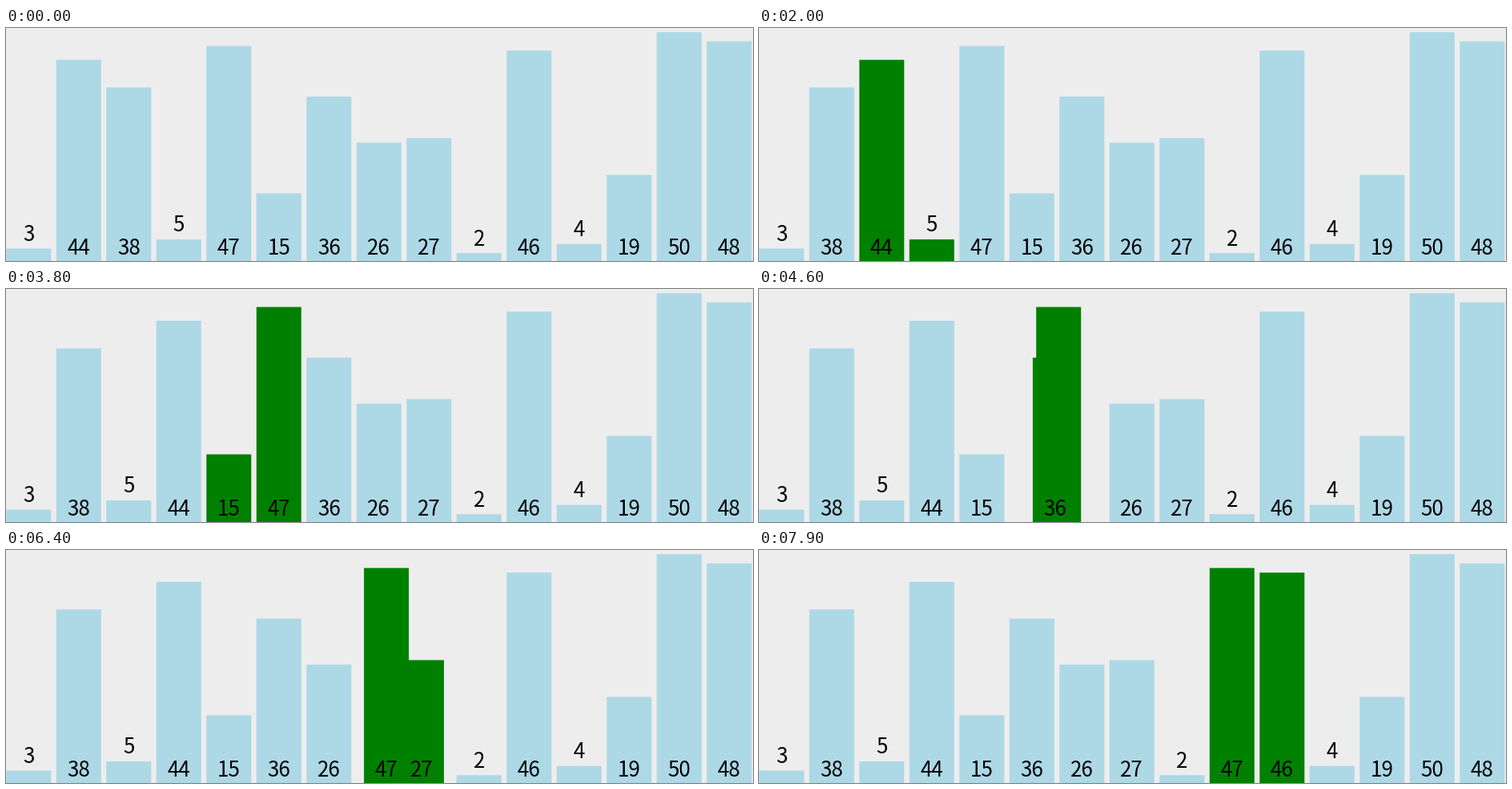
These frames come from a looping animation (933x291 px, 8 s). A matplotlib script:

```python
import matplotlib.pyplot as plt
import numpy as np
from matplotlib.animation import FuncAnimation
from matplotlib.patches import Rectangle

W, H, DPI = 933, 291, 64
FRAMES, INTERVAL = 80, 100

VALUES = [3, 44, 38, 5, 47, 15, 36, 26, 27, 2, 46, 4, 19, 50, 48]
PITCH, LEFT, BAR_W = 62.5, 0.3, 56
UNIT, BASE = 5.75, 292.75
FONT_PX = 26

BLUE = np.array([173, 216, 230]) / 255
GREEN = np.array([0, 128, 0]) / 255

# Start times in ms: highlighting pair (i, i + 1), then swapping it if needed.
MARKS = [370, 820, 1750, 2670, 3115, 4030, 4945, 5870, 6790, 7720]
SWAPS = {1: 1290, 2: 2215, 4: 3545, 5: 4470, 6: 5390, 7: 6333, 8: 7250}
FADE_MS, SWAP_MS = 200, 250


def bezier_ease(x1, y1, x2, y2):
    u = np.linspace(0, 1, 201)

    def curve(a, b):
        return 3 * a * u * (1 - u) ** 2 + 3 * b * u ** 2 * (1 - u) + u ** 3

    xs, ys = curve(x1, x2), curve(y1, y2)
    return lambda t: float(np.interp(t, xs, ys))


ease = bezier_ease(0.25, 0.1, 0.25, 1)
ease_in_out = bezier_ease(0.42, 0, 0.58, 1)


def state_at(ms):
    """Return the slot, green share and stacking rank of every value."""
    order = list(VALUES)
    shade = dict.fromkeys(VALUES, 0.0)
    active, shift = (), 0.0
    for i, start in enumerate(MARKS):
        if ms < start:
            break
        if shift:
            order[i - 1], order[i] = order[i], order[i - 1]
        previous, active = active, (order[i], order[i + 1])
        k = ease((ms - start) / FADE_MS)
        shade = {v: (1 - k) * (v in previous) + k * (v in active)
                 for v in VALUES}
        shift = ease_in_out((ms - SWAPS[i]) / SWAP_MS) if i in SWAPS else 0.0
    rank = {v: i for i, v in enumerate(order)}
    slot = dict(rank)
    if active:
        slot[active[0]] += shift
        slot[active[1]] -= shift
    return slot, shade, rank


fig = plt.figure(figsize=(W / DPI, H / DPI), dpi=DPI, facecolor="#ededed")
ax = fig.add_axes([0, 0, 1, 1])
ax.set_xlim(0, W)
ax.set_ylim(H, 0)
ax.axis("off")

bars, labels = {}, {}
for value in VALUES:
    top = BASE - UNIT * value
    bars[value] = ax.add_patch(
        Rectangle((0, top), BAR_W, H + 5 - top, lw=0, snap=False))
    baseline = 283 if value > 5 else top - 9.7
    labels[value] = ax.text(0, baseline, str(value), ha="center",
                            va="baseline", color="black",
                            family="Noto Sans CJK JP",
                            fontsize=FONT_PX * 72 / DPI)


def draw(frame):
    slot, shade, rank = state_at(frame * INTERVAL)
    for value in VALUES:
        x = LEFT + PITCH * slot[value]
        bar, label = bars[value], labels[value]
        bar.set_x(x)
        bar.set_facecolor(BLUE + (GREEN - BLUE) * shade[value])
        bar.set_zorder(2 * rank[value] + 1)
        label.set_x(x + BAR_W / 2)
        label.set_zorder(2 * rank[value] + 2)
    return [*bars.values(), *labels.values()]


animation = FuncAnimation(fig, draw, frames=FRAMES, interval=INTERVAL,
                          init_func=lambda: draw(0), repeat=True,
                          repeat_delay=0)
plt.show()
```
